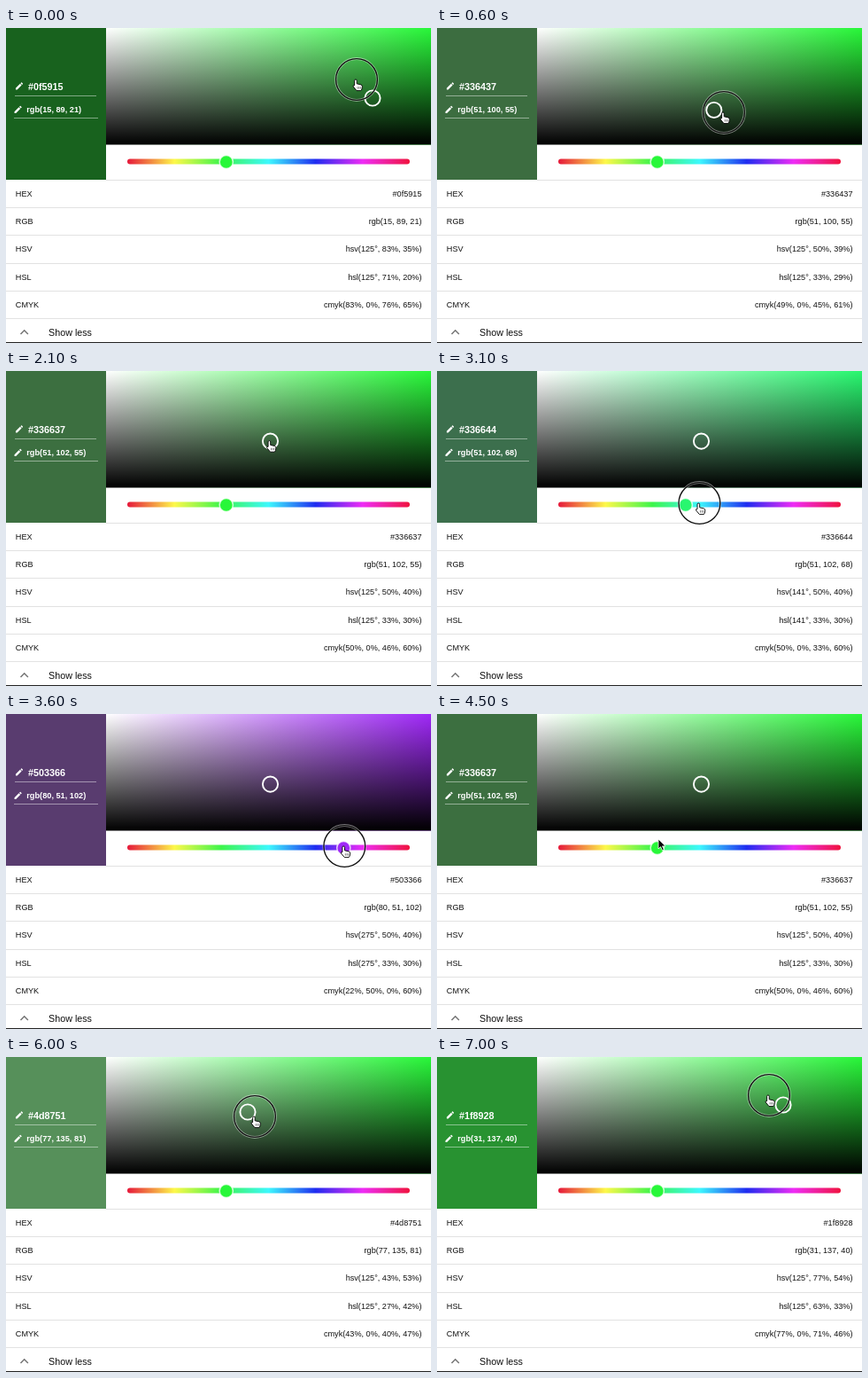
Animation of 480 by 355 pixels, one loop 7.1 s. Source, as an HTML page:

```html
<!DOCTYPE html>
<html lang="en">
<head>
<meta charset="utf-8">
<title>Color picker</title>
<style>
  html, body { margin: 0; width: 100%; height: 100%; overflow: hidden; background: #fff; }
  svg { display: block; width: 480px; height: 355px; }
  text { font-family: "Liberation Sans", Arial, sans-serif; font-size: 9.15px; fill: #111; }
  .value { text-anchor: end; }
  .side { font-weight: bold; fill: #fff; font-size: 9.2px; }
  .side.hex { font-size: 10.8px; }
  .more { font-size: 10.75px; }
  .rule { stroke: #e2e2e2; }
  .underline { stroke: #fff; stroke-opacity: .45; }
</style>
</head>
<body>
<svg viewBox="0 0 480 355">
  <defs>
    <linearGradient id="sat"><stop stop-color="#fff"/><stop id="pure" offset="1"/></linearGradient>
    <linearGradient id="val" x2="0" y2="1"><stop stop-opacity="0"/><stop offset="1"/></linearGradient>
    <linearGradient id="rainbow">
      <stop stop-color="#e6193b"/>
      <stop offset=".167" stop-color="#fdf84a"/>
      <stop offset=".333" stop-color="#3df54b"/>
      <stop offset=".5" stop-color="#3df8fd"/>
      <stop offset=".667" stop-color="#1f2cf0"/>
      <stop offset=".833" stop-color="#ee2cf5"/>
      <stop offset="1" stop-color="#f0143f"/>
    </linearGradient>
    <path id="pencil" d="M3 17.25V21h3.75L17.81 9.94l-3.75-3.75L3 17.25zM20.71 7.04c.39-.39.39-1.02 0-1.41l-2.34-2.34c-.39-.39-1.02-.39-1.41 0l-1.83 1.83 3.75 3.75 1.83-1.83z"/>
  </defs>

  <rect id="swatch" width="113" height="171"/>
  <g fill="#fff">
    <use href="#pencil" transform="translate(9.6 60) scale(.45)"/>
    <use href="#pencil" transform="translate(8.2 86.5) scale(.45)"/>
  </g>
  <text class="side hex" id="sideHex" x="25" y="69.7"/>
  <text class="side" id="sideRgb" x="23.3" y="95"/>
  <path class="underline" d="M10 76.5H102M9 101.5H104"/>

  <rect x="113" width="367" height="131.5" fill="url(#sat)"/>
  <rect x="113" width="367" height="131.5" fill="url(#val)"/>
  <rect x="137" y="147.5" width="319" height="6" rx="3" fill="url(#rainbow)"/>

  <g id="rows"></g>
  <path d="M16.5 345l4.2-4.2 4.2 4.2" fill="none" stroke="#757575" stroke-width="1.5"/>
  <text class="more" x="48" y="346.5">Show less</text>
  <rect y="354" width="480" height="1" fill="#222"/>

  <circle id="knob" cy="151" r="7.6" stroke="#fff" stroke-opacity=".75" stroke-width="1.5"/>
  <circle id="ring" r="8.6" fill="none" stroke="#fff" stroke-width="1.9"/>

  <g id="cursor">
    <g id="press" fill="none">
      <circle cx="1" r="23.4" stroke="#fff" stroke-opacity=".45" stroke-width="3"/>
      <circle cx="1" r="23.4" stroke="#111" stroke-width="1.4"/>
    </g>
    <g id="hand" stroke="#000" stroke-width=".9" stroke-linejoin="round">
      <path fill="#fff" d="M-1.4 1.3a1.3 1.3 0 0 1 2.6 0v3.5l4.7 1.1q1.6.5 1.5 2.2l-.5 2.9-1 1.6h-4.9l-3.9-4.7q-.5-1.5 1.5-1.2z"/>
      <path d="M2 8.2v2.4M3.7 8.2v2.4M5.3 8.2v2.4" stroke-width=".5"/>
    </g>
    <path id="arrow" d="M0 0v11l2.6-2.4 1.8 4 1.9-.9-1.8-3.8h3.6z" stroke="#fff" stroke-width=".8"/>
  </g>
</svg>
<script>
const LOOP = 7100, STEP = 100, RING_LAG = 40, COLOR_LAG = 100;
const PANEL = { x: 113, w: 367, h: 131 };
const SLIDER = { x: 137, w: 319 };
const $ = id => document.getElementById(id);

// Pointer path: time, x, y
const path = [
  [-100, 417.6, 85.15], [-40, 412, 78.5], [0, 394, 58], [200, 335, 30],
  [400, 281, 56], [600, 322, 95], [800, 402, 64], [1000, 326, 34],
  [1200, 302, 78.86], [1260, 326, 94.5], [1300, 332, 97], [1500, 380, 65],
  [1650, 330, 46], [1800, 296.5, 78.6], [2300, 296.5, 78.6],
  [2800, 247.76, 149], [2900, 247.76, 149], [3400, 380.3, 149],
  [3800, 380.3, 149], [4200, 247.76, 149], [4300, 247.76, 149],
  [4500, 249, 141], [5000, 296.5, 78.6], [5100, 296.5, 78.6],
  [5300, 385, 78], [5450, 390, 40], [5700, 290, 38], [5900, 271.1, 61.9],
  [5960, 271, 61.5], [6000, 279, 67], [6200, 345, 93], [6350, 385, 60],
  [6500, 335, 40], [6650, 305, 68], [6800, 365, 88], [6900, 397.1, 60.65],
  [6960, 389, 53.5], [7000, 373, 43]
];

const clamp = (v, lo, hi) => Math.min(hi, Math.max(lo, v));

function slope(i, axis) {
  if (i < 1 || i > path.length - 2) return 0;
  const rate = k => (path[k + 1][axis] - path[k][axis]) / (path[k + 1][0] - path[k][0]);
  const a = rate(i - 1), b = rate(i);
  return a * b <= 0 ? 0 : 2 * a * b / (a + b);
}

// Smooth curve through the keys, without overshoot
function pointAt(t) {
  t = clamp(t, path[0][0], path[path.length - 1][0]);
  let i = 0;
  while (i < path.length - 2 && t >= path[i + 1][0]) i++;
  const p = path[i], q = path[i + 1], d = q[0] - p[0], u = (t - p[0]) / d;
  const at = axis =>
    p[axis] * (1 + 2 * u) * (1 - u) ** 2 + q[axis] * u * u * (3 - 2 * u) +
    d * (slope(i, axis) * u * (1 - u) ** 2 - slope(i + 1, axis) * u * u * (1 - u));
  return { x: at(1), y: at(2) };
}

// Outside a drag the controls keep their last position
const panelPoint = t => pointAt(t < 5100 ? Math.min(t, 1800) : t);
const sliderX = t => pointAt(clamp(t, 2900, 4200)).x;

function hsvToRgb(h, s, v) {
  return [5, 3, 1].map(n => {
    const k = (n + h / 60) % 6;
    return 255 * v * (1 - s * clamp(Math.min(k, 4 - k), 0, 1));
  });
}

const pct = v => Math.round(v * 100) + "%";
const css = c => `rgb(${c.map(Math.round).join(",")})`;

function describe(h, s, v) {
  const rgb = hsvToRgb(h, s, v).map(Math.round);
  const max = Math.max(...rgb) || 1, deg = Math.round(h) + "°";
  const s2 = Math.round(s * 100) / 100, v2 = Math.round(v * 100) / 100;
  const l = v2 * (1 - s2 / 2), sl = (v2 - l) / (Math.min(l, 1 - l) || 1);
  const cmyk = [...rgb.map(c => 1 - c / max), 1 - max / 255];
  return {
    rgb,
    texts: [
      "#" + rgb.map(c => c.toString(16).padStart(2, "0")).join(""),
      `rgb(${rgb.join(", ")})`,
      `hsv(${deg}, ${pct(s)}, ${pct(v)})`,
      `hsl(${deg}, ${pct(sl)}, ${pct(l)})`,
      `cmyk(${cmyk.map(pct).join(", ")})`
    ]
  };
}

$("rows").innerHTML = ["HEX", "RGB", "HSV", "HSL", "CMYK"].map((name, i) => {
  const y = 190.2 + i * 31.1;
  return `<text x="10.8" y="${y}">${name}</text><text class="value" x="469.5" y="${y}"/>`;
}).join("") + [171.5, 202.5, 233.5, 265.5, 296.5, 327.5].map(y =>
  `<path class="rule" d="M${y < 172 ? 113 : 0} ${y}H480"/>`).join("");
const values = document.querySelectorAll(".value");

const move = (el, x, y) => el.setAttribute("transform", `translate(${x} ${y})`);
const show = (el, on) => el.setAttribute("visibility", on ? "visible" : "hidden");

function draw(t) {
  const tip = pointAt(t), ring = panelPoint(t - RING_LAG), picked = panelPoint(t - COLOR_LAG);
  const hue = (sliderX(t - COLOR_LAG) - SLIDER.x) / SLIDER.w * 360;
  const color = describe(hue, (picked.x - PANEL.x) / PANEL.w, 1 - picked.y / PANEL.h);
  const pure = css(hsvToRgb(hue, 1, 1).map(c => 40 + c * .81));

  $("swatch").setAttribute("fill", css(color.rgb.map(c => c + 9)));
  $("pure").setAttribute("stop-color", pure);
  $("knob").setAttribute("fill", pure);
  $("knob").setAttribute("cx", sliderX(t - RING_LAG) + 1);
  move($("ring"), ring.x + 2, ring.y + .5);

  values.forEach((el, i) => el.textContent = color.texts[i]);
  $("sideHex").textContent = color.texts[0];
  $("sideRgb").textContent = color.texts[1];

  const pressed = t < 1800 || (t >= 2900 && t < 4300) || t >= 5100;
  const hand = pressed || tip.y < PANEL.h || tip.y > 146;
  move($("cursor"), tip.x + 1, tip.y);
  show($("press"), pressed);
  show($("hand"), hand);
  show($("arrow"), !hand);
}

function tick() {
  const t = performance.now() % LOOP;
  draw(Math.floor(t / STEP) * STEP);
  requestAnimationFrame(tick);
}
tick();
</script>
</body>
</html>
```
